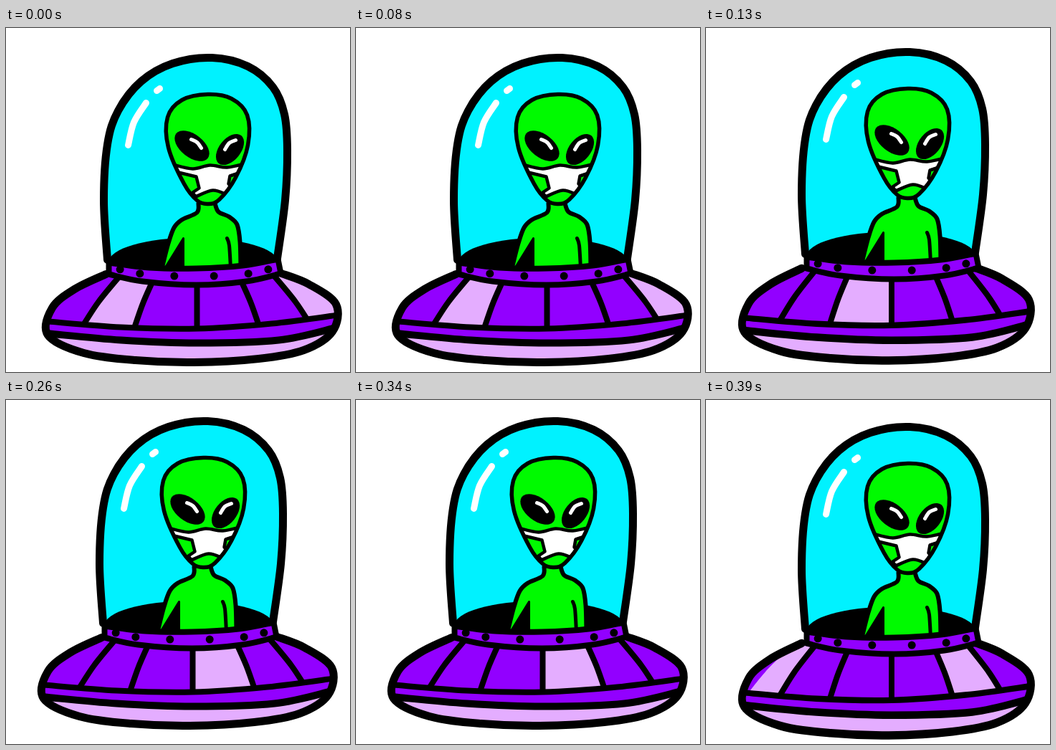
An HTML page with a canvas that plays this animation: 480 by 480 pixels, repeating every 520 ms.

```html
<!DOCTYPE html>
<html lang="en">
<head>
<meta charset="utf-8">
<title>Masked alien in a saucer</title>
<style>
  html, body { margin: 0; width: 100%; height: 100%; overflow: hidden; background: #fff; }
  canvas { display: block; width: 480px; height: 480px; }
</style>
</head>
<body>
<canvas id="stage" width="480" height="480"></canvas>
<script>
const ctx = document.getElementById('stage').getContext('2d');
const POSE_MS = 130, POSES = 4;
const BLACK = '#000', WHITE = '#fff', CYAN = '#00f2ff', GREEN = '#00fa00';
const PURPLE = '#9200ff', PINK = '#e4adff';

// Smooth curves through "x y x y ..." points, joined by straight lines.
// A curve that ends where it starts is smooth there too.
function trace(...curves) {
  const path = new Path2D();
  for (const curve of curves) {
    const points = curve.match(/[\d.]+ [\d.]+/g).map(pair => pair.split(' ').map(Number));
    const last = points.length - 1;
    const closed = points[0].join() === points[last].join();
    path.lineTo(...points[0]);
    for (let i = 1; i <= last; i++) {
      const a = points[i - 1], b = points[i];
      const before = points[i - 2] || (closed ? points[last - 1] : a);
      const after = points[i + 1] || (closed ? points[1] : b);
      path.bezierCurveTo(
        a[0] + (b[0] - before[0]) / 6, a[1] + (b[1] - before[1]) / 6,
        b[0] - (after[0] - a[0]) / 6, b[1] - (after[1] - a[1]) / 6, ...b);
    }
  }
  return path;
}

function ellipse(x, y, rx, ry = rx, degrees = 0) {
  const path = new Path2D();
  path.ellipse(x, y, rx, ry, degrees * Math.PI / 180, 0, 2 * Math.PI);
  return path;
}

function fill(path, color) {
  ctx.fillStyle = color;
  ctx.fill(path);
}

function stroke(path, width, color = BLACK) {
  ctx.lineWidth = width;
  ctx.strokeStyle = color;
  ctx.stroke(path);
}

function isolated(draw) {
  ctx.save();
  draw();
  ctx.restore();
}

const dome = trace('141 323 136 240 141 162 156 115 188 74 232 49 287 41 337 53 372 82 388 120 392 170 389 240 378 321');
const glints = [trace('210 87 214 84'), trace('195 104 178 131 170 163')];
const floor = ellipse(261, 326, 118, 34);
const rim = trace('143 327 200 334 265 335 330 331 379 322', '383 342 335 353 265 358 190 353 143 343');
rim.closePath();

const hull = trace('139 343 95 364 64 390 58 428 108 453 180 463 262 466 352 461 415 449 455 423 460 385 422 357 384 342');
const upperBand = '58 409 160 417 266 419 370 412 463 400';
const lowerBand = '60 426 160 435 266 439 380 435 459 418';

const face = trace('281 92 245 100 225 124 226 166 248 217 266 240 281 245 297 239 320 208 337 163 336 121 314 98 281 92');
const torso = trace('268 244 266 257 245 267 234 278 226 300 217 335', '327 335 326 298 322 274 311 263 296 256 291 244');
const armGap = trace('247 293 221 335', '247 335 247 293');
const armLine = trace('308 293 311 303 313 335');
const eyes = [ellipse(259, 164, 28, 16, 38), ellipse(312, 169, 25, 15, -51)];
const shines = [trace('258 155 266 159 272 167'), trace('320 156 311 160 305 169')];
const mask = trace('232 190 260 196 284 191 308 194 336 188', '327 201 312 206', '310 217 315 222',
  '308 232 288 226 264 235', '260 229 269 223', '265 207 240 201');
mask.closePath();

// Ribs fan out from the rim; i counts from the middle one.
function rib(i) {
  const x = radius => (266 + Math.sin(i * 0.4) * radius).toFixed(1);
  return `${x(146)} 342 ${x(192)} 382 ${x(228)} 422`;
}

function drawHull(pose) {
  ctx.save();
  ctx.clip(hull);
  fill(hull, PURPLE);
  // Every fourth panel is lit, and the lights step one panel to the right.
  for (let panel = 0; panel < 6; panel++) {
    if (panel % 4 !== (pose + 1) % 4) continue;
    isolated(() => {
      ctx.clip(trace(rib(panel - 3), '480 480 480 300'));
      const right = trace(rib(panel - 2), '0 480 0 300');
      fill(panel < 5 ? right : hull, PINK);
    });
  }
  for (let i = -2; i <= 2; i++) stroke(trace(rib(i)), 8);
  for (const [band, color, width] of [[upperBand, PURPLE, 8], [lowerBand, PINK, 10]]) {
    fill(trace(band, '480 480 0 480'), color);
    stroke(trace(band), width);
  }
  ctx.restore();
  stroke(hull, 11);
}

function drawAlien() {
  fill(torso, GREEN);
  stroke(torso, 6);
  fill(armGap, BLACK);
  stroke(armGap, 3);
  stroke(armLine, 5);
  fill(face, GREEN);
  isolated(() => {
    ctx.clip(face);
    fill(mask, WHITE);
    stroke(mask, 4.5);
  });
  stroke(face, 5.5);
  eyes.forEach(eye => fill(eye, BLACK));
  shines.forEach(shine => stroke(shine, 5, WHITE));
}

function drawRim() {
  fill(rim, PURPLE);
  stroke(rim, 8);
  for (let degrees = -75; degrees <= 75; degrees += 30) {
    const angle = degrees * Math.PI / 180;
    fill(ellipse(262 + 107 * Math.sin(angle), 333 + 13 * Math.cos(angle), 5.5), BLACK);
  }
}

function drawPose(pose) {
  const angle = pose / POSES * 2 * Math.PI;
  const sway = Math.sin(angle) ** 2;
  ctx.fillStyle = WHITE;
  ctx.fillRect(0, 0, 480, 480);
  ctx.lineCap = ctx.lineJoin = 'round';
  isolated(() => {
    ctx.translate(3 * Math.cos(angle) - 2.5, 6 * Math.cos(angle) - 2 * Math.sin(angle) - 5.5);
    isolated(() => {
      // The hull grows deeper and narrower on the way up and down.
      ctx.translate(55 - 2 * sway, 345);
      ctx.scale(1 - 0.012 * sway, 1 + 0.045 * sway);
      ctx.translate(-55, -345);
      drawHull(pose);
    });
    fill(dome, CYAN);
    fill(floor, BLACK);
    isolated(() => {
      ctx.translate(3 * sway, 0);
      drawAlien();
    });
    glints.forEach(glint => stroke(glint, 9, WHITE));
    stroke(dome, 11);
    drawRim();
  });
}

const start = performance.now();
function tick() {
  const elapsed = performance.now() - start;
  drawPose(Math.floor(elapsed / POSE_MS) % POSES);
  requestAnimationFrame(tick);
}
tick();
</script>
</body>
</html>
```
